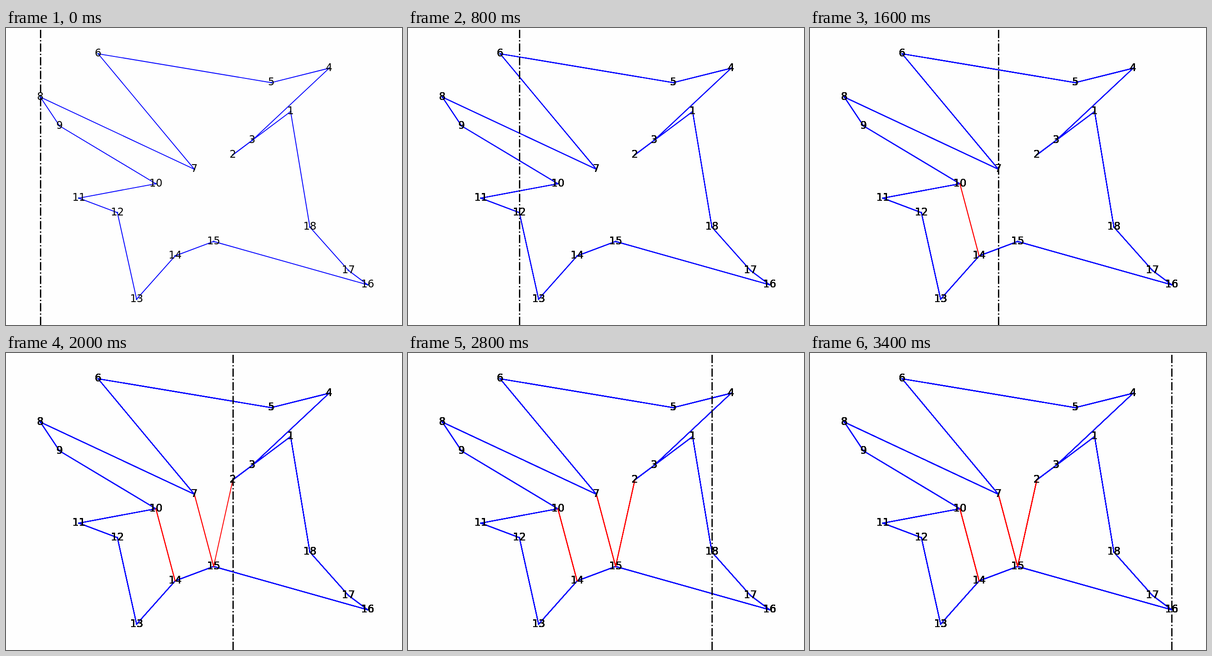
These frames come from a looping animation (864x648 px, 3600 ms). An HTML page:

```html
<!DOCTYPE html>
<html lang="en">
<head>
<meta charset="utf-8">
<title>Sweep line over a polygon</title>
<style>
  html, body { margin: 0; width: 100%; height: 100%; overflow: hidden; background: #fefefe; }
  svg { display: block; width: 864px; height: 648px; }
  .edge { stroke: #00f; }
  .diagonal { stroke: #f00; }
  .edge, .diagonal { fill: none; stroke-width: 1.875; stroke-linecap: square; }
  .dot { fill: #1f77b4; }
  .label { font: 22.5px "DejaVu Sans", sans-serif; text-anchor: middle; }
</style>
</head>
<body>
<svg id="stage" viewBox="0 0 864 648">
  <defs><g id="outline"></g><g id="labels"></g></defs>
  <g id="dots"></g>
  <g id="lines"></g>
  <line id="sweep" y1="648" y2="0" stroke="#000" stroke-width="2.8125"
        stroke-dasharray="18 4.5 2.8125 4.5"/>
  <g id="text"></g>
</svg>
<script>
const NS = 'http://www.w3.org/2000/svg';
const STEP = 200;

// Column and row of vertices 1 to 18; every vertex has its own column.
const cols = [13, 10, 11, 15, 12, 3, 8, 0, 1, 6, 2, 4, 5, 7, 9, 17, 16, 14];
const rows = [4, 7, 6, 1, 2, 0, 8, 3, 5, 9, 10, 11, 17, 14, 13, 16, 15, 12];
const COUNT = cols.length;
const points = cols.map((c, i) => ({ x: 74.98 + 42 * c, y: 56.23 + 31.5 * rows[i] }));

// Diagonals as [from, to, step at which the sweep adds them]
const diagonals = [[14, 10, 7], [15, 7, 9], [2, 15, 10]];

const byId = id => document.getElementById(id);

function add(parent, tag, attrs, text) {
  const el = document.createElementNS(NS, tag);
  for (const key in attrs) el.setAttribute(key, attrs[key]);
  if (text !== undefined) el.textContent = text;
  parent.appendChild(el);
  return el;
}

function segment(parent, a, b, cls) {
  return add(parent, 'path', { class: cls, d: `M${a.x} ${a.y}L${b.x} ${b.y}` });
}

points.forEach((p, i) => {
  segment(byId('outline'), p, points[(i + 1) % COUNT], 'edge');
  add(byId('dots'), 'circle', { class: 'dot', cx: p.x, cy: p.y, r: 2 });
  add(byId('labels'), 'text', { class: 'label', x: p.x, y: Math.round(p.y + 6.2) }, i + 1);
});

// Each step draws everything once more, so soft edges build up during the sweep.
const layers = [];
for (let step = 0; step < COUNT; step++) {
  const lines = add(byId('lines'), 'g', {});
  add(lines, 'use', { href: '#outline' });
  for (const [a, b, start] of diagonals) {
    if (step >= start) segment(lines, points[a - 1], points[b - 1], 'diagonal');
  }
  layers.push([lines, add(byId('text'), 'use', { href: '#labels' })]);
}

let shown = -1;

function render(time) {
  const step = Math.floor(time / STEP) % COUNT;
  if (step === shown) return;
  shown = step;
  const x = 75.5 + 42 * step;
  byId('sweep').setAttribute('x1', x);
  byId('sweep').setAttribute('x2', x);
  layers.forEach((pair, i) => {
    for (const el of pair) el.style.display = i <= step ? '' : 'none';
  });
}

const begin = performance.now();

function tick() {
  render(performance.now() - begin);
  requestAnimationFrame(tick);
}

tick();
</script>
</body>
</html>
```
